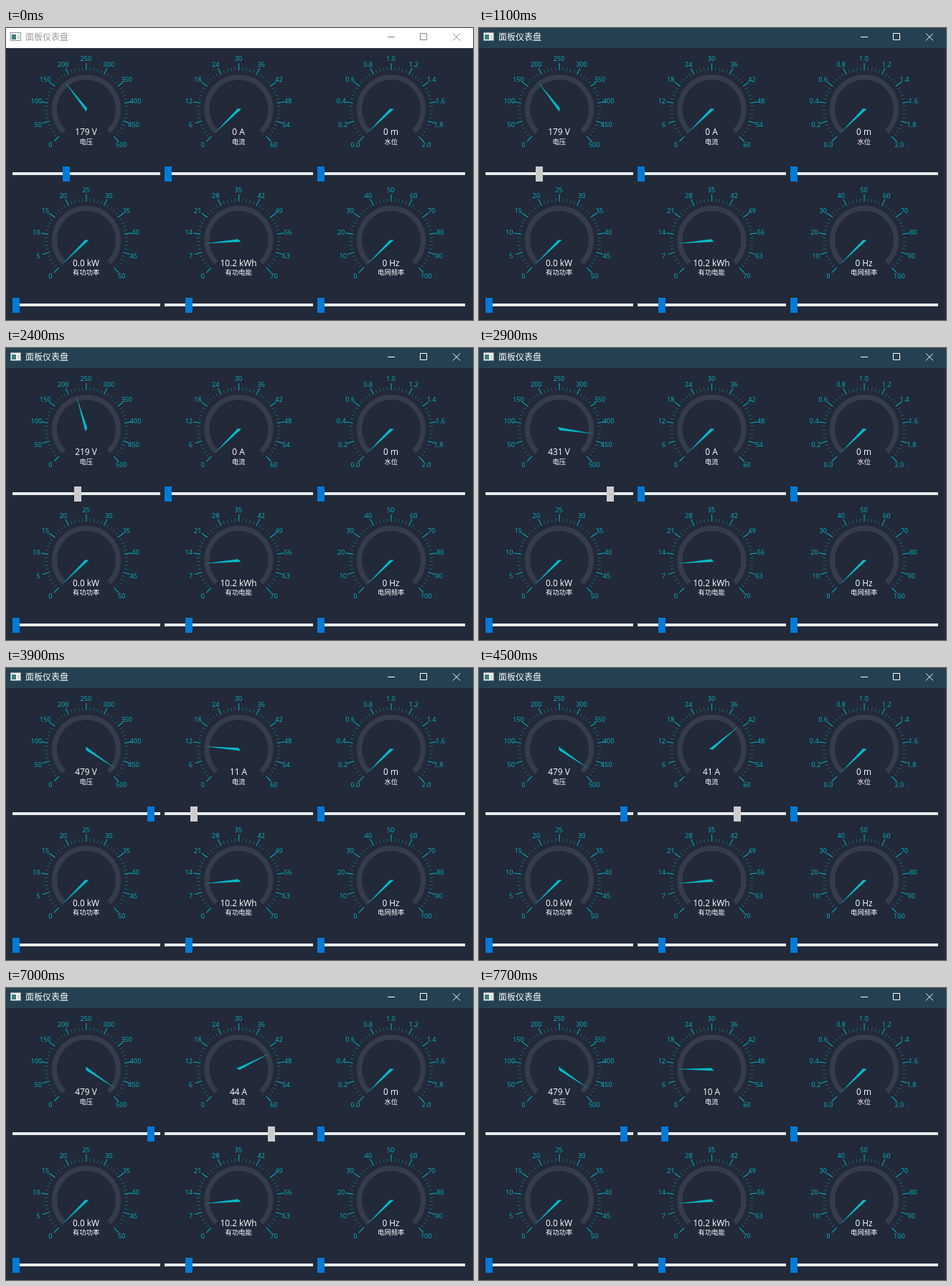
An HTML page that plays this animation: 651 by 407 pixels, repeating every 8 s.

```html
<!DOCTYPE html>
<html lang="zh">
<head>
<meta charset="utf-8">
<title>面板仪表盘</title>
<style>
  html, body { margin: 0; width: 100%; height: 100%; overflow: hidden; background: #222938; }
  svg { display: block; width: 651px; height: 407px; }
  text { font-family: "Open Sans", "Noto Sans", sans-serif; text-anchor: middle; }
  .num { font-size: 9.2px; fill: #02b5c4; }
  .value { font-size: 11.9px; fill: #fff; }
  .name { font: 9.3px "Noto Sans CJK SC", "Noto Sans CJK", sans-serif; fill: #fff; }
  .caption { font: 12px "Noto Sans CJK SC", "Noto Sans CJK", sans-serif; text-anchor: start; }
  .ring { fill: none; stroke: #363d4a; stroke-width: 7; }
  .major { stroke: #02aebd; stroke-width: 1.1; }
  .minor { stroke: #176572; stroke-width: 1; }
  .needle { fill: #06b9c6; }
  .bar { fill: #fff; }
  .caption { fill: #999; }
  .buttons { fill: none; stroke: #888; }
  .active .bar { fill: #254050; }
  .active .caption { fill: #fff; }
  .active .buttons { stroke: #fff; }
</style>
</head>
<body>
<svg id="stage" viewBox="0 0 651 407">
  <rect width="651" height="407" fill="#222938"/>
  <g id="titlebar">
    <rect class="bar" width="651" height="28"/>
    <rect x="6.5" y="6.5" width="14" height="11" fill="#f4f6f6" stroke="#8d9898"/>
    <rect x="8" y="9" width="6" height="7" fill="#3d8078"/>
    <path d="M16 10.5h3M16 12.5h3M16 14.5h3" stroke="#b4bcbc"/>
    <text class="caption" x="27" y="17">面板仪表盘</text>
    <path class="buttons" d="M532 12.5h10M577.5 7.5h9v9h-9zM623 7.5l10 10M633 7.5l-10 10"/>
  </g>
</svg>
<script>
const LOOP = 8000, STEP = 100;
const stage = document.getElementById('stage');
const titlebar = document.getElementById('titlebar');
const IDLE = '#007ad9', HOVER = '#171717', PRESSED = '#cccccc';

// keys: [time, value], interpolated; look: [time, handle colour], held
const gauges = [
  { name: '电压', unit: 'V', max: 500,
    keys: [[1100, 179], [1900, 49], [2000, 49], [2900, 431], [3000, 479]],
    look: [[0, IDLE], [700, HOVER], [1100, PRESSED], [3100, IDLE]] },
  { name: '电流', unit: 'A', max: 60,
    keys: [[3700, 0], [4400, 37], [4700, 49], [4800, 51], [5400, 51], [5500, 60],
           [5700, 60], [5800, 50], [6900, 50], [7600, 10]],
    look: [[0, IDLE], [3600, HOVER], [3700, PRESSED], [4900, IDLE],
           [6800, HOVER], [6900, PRESSED], [7700, IDLE]] },
  { name: '水位', unit: 'm', max: 2, numDigits: 1 },
  { name: '有功功率', unit: 'kW', max: 50, digits: 1 },
  { name: '有功电能', unit: 'kWh', max: 70, digits: 1, keys: [[0, 10.2]] },
  { name: '电网频率', unit: 'Hz', max: 100 }
];

function add(tag, attrs, parent, text) {
  const el = document.createElementNS('http://www.w3.org/2000/svg', tag);
  for (const key in attrs) el.setAttribute(key, attrs[key]);
  if (text !== undefined) el.textContent = text;
  return parent.appendChild(el);
}

const angleAt = part => 135 + 270 * part;

function polar(radius, part) {
  const a = angleAt(part) * Math.PI / 180;
  return [radius * Math.cos(a), radius * Math.sin(a)];
}

function tick(parent, kind, part, outer) {
  const [x1, y1] = polar(54, part), [x2, y2] = polar(outer, part);
  add('line', { class: kind, x1, y1, x2, y2 }, parent);
}

function build(gauge, i) {
  const col = i % 3, row = Math.floor(i / 3);
  const dial = add('g', { transform: `translate(${112 + 212.5 * col} ${113 + 182.8 * row})` }, stage);
  const [x0, y0] = polar(44.5, 0), [x1, y1] = polar(44.5, 1);
  add('path', { class: 'ring', d: `M${x0} ${y0}A44.5 44.5 0 1 1 ${x1} ${y1}` }, dial);

  for (let n = 0; n <= 50; n++) {
    const isMajor = n % 5 === 0;
    tick(dial, isMajor ? 'major' : 'minor', n / 50, isMajor ? 64 : 58.5);
    if (!isMajor) continue;
    const [x, y] = polar(70, n / 50);
    add('text', { class: 'num', x: x - 0.6, y: y + 3.3 }, dial,
      (gauge.max * n / 50).toFixed(gauge.numDigits || 0));
  }

  gauge.needle = add('path', { class: 'needle', d: 'M-2.8-2.4L48.5 0L.7 1.6z' }, dial);
  gauge.value = add('text', { class: 'value', x: -0.5, y: 36.4 }, dial);
  add('text', { class: 'name', x: -0.3, y: 48.5 }, dial, gauge.name);

  gauge.left = [9, 221, 434][col];
  const top = 193 + 183 * row;
  add('rect', { x: gauge.left, y: top + 8, width: col === 1 ? 207 : 206, height: 4, fill: '#e7eaea' }, stage);
  gauge.handle = add('rect', { y: top, width: 10, height: 21, fill: IDLE }, stage);
}

function valueAt(keys, t) {
  if (t <= keys[0][0]) return keys[0][1];
  for (let i = 1; i < keys.length; i++) {
    const [ta, a] = keys[i - 1], [tb, b] = keys[i];
    if (t <= tb) return a + (b - a) * (t - ta) / (tb - ta);
  }
  return keys[keys.length - 1][1];
}

function update(gauge, t) {
  const digits = gauge.digits || 0;
  const value = Number(valueAt(gauge.keys || [[0, 0]], t).toFixed(digits));
  const part = value / gauge.max;
  gauge.needle.setAttribute('transform', `rotate(${angleAt(part)})`);
  gauge.value.textContent = `${value.toFixed(digits)} ${gauge.unit}`;
  gauge.handle.setAttribute('x', gauge.left + Math.round(196 * part));
  if (gauge.look) {
    gauge.handle.setAttribute('fill', gauge.look.filter(([from]) => from <= t).pop()[1]);
  }
}

let shown = -1;
function render() {
  const t = Math.floor(performance.now() % LOOP / STEP) * STEP;
  if (t !== shown) {
    shown = t;
    titlebar.classList.toggle('active', t >= 1100);
    gauges.forEach(gauge => update(gauge, t));
  }
  requestAnimationFrame(render);
}

gauges.forEach(build);
render();
</script>
</body>
</html>
```
